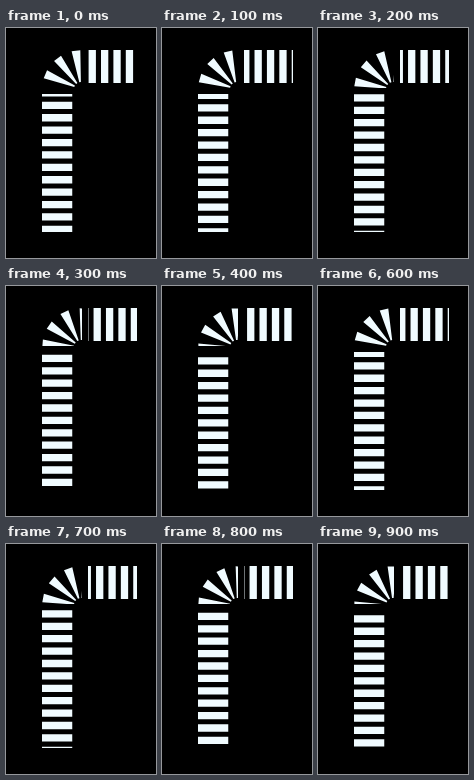
Write an HTML page that moves like this. It is 150 px wide and 230 px high and loops after 1 s.

```html
<!DOCTYPE html>
<html lang="en">
<head>
<meta charset="utf-8">
<title>Flowing stripes</title>
<style>
  html, body { margin: 0; width: 100%; height: 100%; overflow: hidden; background: #000; }
  svg { display: block; width: 100vw; height: 100vh; }
</style>
</head>
<body>
<svg viewBox="0 0 150 230">
  <clipPath id="top"><rect x="82" y="22" width="49" height="33"/></clipPath>
  <clipPath id="bend"><rect x="36" y="22" width="40" height="38"/></clipPath>
  <clipPath id="side"><rect x="36" y="66" width="30.5" height="138"/></clipPath>
  <g fill="#f0fbff">
    <path id="across" clip-path="url(#top)"/>
    <path id="turn" clip-path="url(#bend)"/>
    <path id="down" clip-path="url(#side)"/>
  </g>
</svg>
<script>
  const STEP = 100, STEPS = 5;
  const PERIOD = 12.4, DASH = 7.3;
  const SECTOR = 30, WEDGE = 13;
  const CX = 75, CY = 61, INNER = 7, OUTER = 38.8;

  const byId = id => document.getElementById(id);
  const across = byId('across'), turn = byId('turn'), down = byId('down');

  const repeat = (from, to, shape) => {
    let d = '';
    for (let n = from; n <= to; n++) d += shape(n);
    return d;
  };

  // Angles run counterclockwise from straight up.
  const polar = (r, deg) => {
    const a = deg * Math.PI / 180;
    return `${(CX - r * Math.sin(a)).toFixed(2)},${(CY - r * Math.cos(a)).toFixed(2)}`;
  };

  const wedge = a =>
    `M${polar(INNER, a)}L${polar(OUTER, a)} ${polar(OUTER, a - WEDGE)} ${polar(INNER, a - WEDGE)}Z`;

  function draw(t) {
    const shift = Math.floor(t / STEP) % STEPS / STEPS;
    across.setAttribute('d', repeat(0, 5, n =>
      `M${82.6 + (n - shift) * PERIOD},22h${DASH}v33h${-DASH}z`));
    turn.setAttribute('d', repeat(-1, 3, n => wedge(14 + (n + shift) * SECTOR)));
    down.setAttribute('d', repeat(-2, 11, n =>
      `M36,${73.7 + (n + shift) * PERIOD}h30.5v${DASH}h-30.5z`));
  }

  const start = performance.now();
  function tick() {
    draw(performance.now() - start);
    requestAnimationFrame(tick);
  }
  tick();
</script>
</body>
</html>
```
